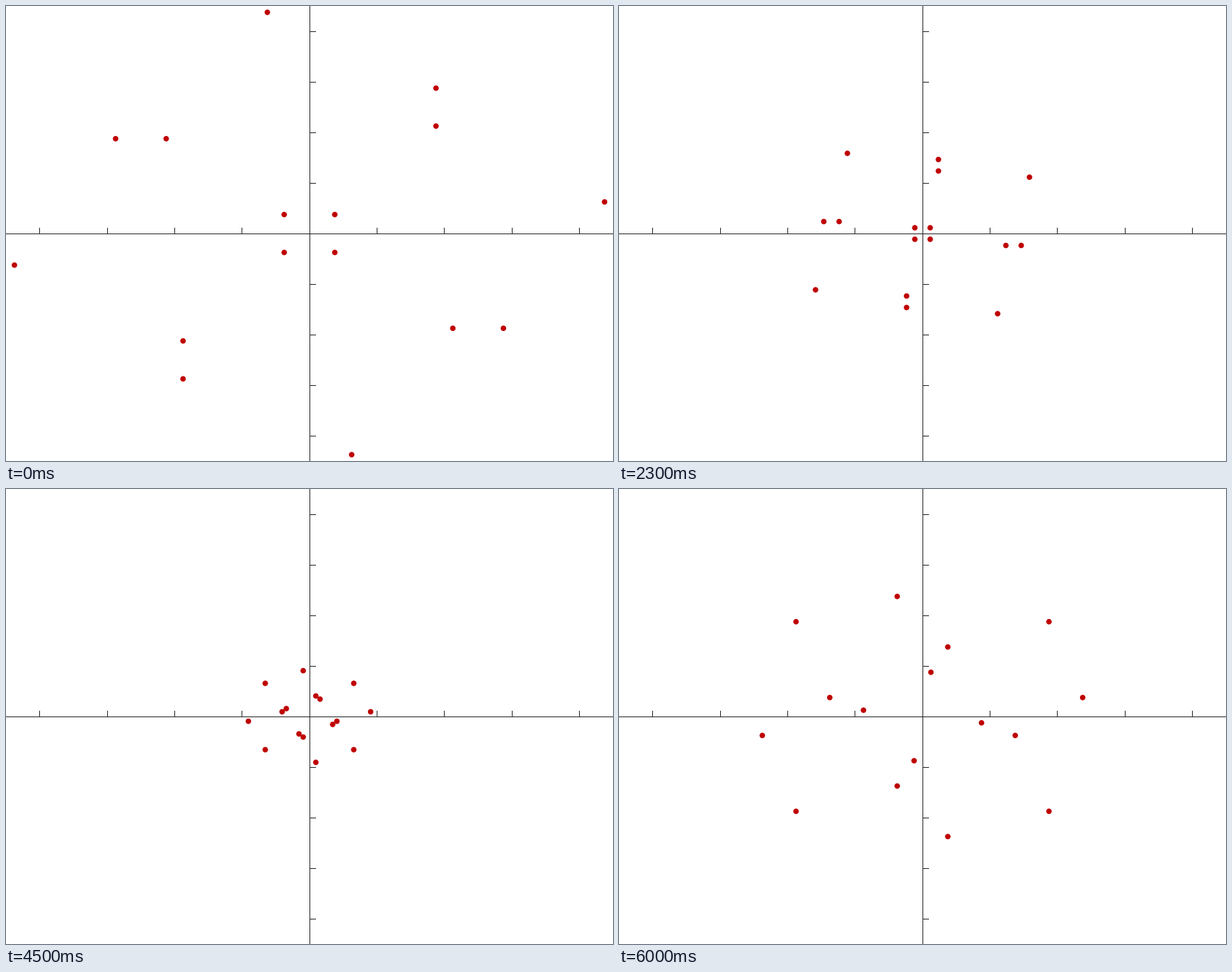
Write a matplotlib script that moves like this. It is 840x630 px and loops after 6100 ms.

```python
import itertools

import matplotlib.pyplot as plt
from matplotlib.animation import FuncAnimation
from matplotlib.collections import LineCollection
from matplotlib.patches import Circle

W, H, DPI = 840, 630, 100
CX, CY = W // 2, H // 2
UNIT_X, UNIT_Y = W / 9, H / 9      # both axes span -4.5 to 4.5
FRAMES, INTERVAL = 61, 100
TICK = 8
RADIUS = 3.8

QPSK = [1 + 1j, -1 + 1j, -1 - 1j, 1 - 1j]
PAIRS = list(itertools.product(QPSK, QPSK))


def constellation(n):
    """Sum of two QPSK signals whose channel gains drift with time."""
    re = 1.25 - 0.025 * n
    q = 0.75 - 0.025 * n
    h1 = complex(re, -2 * q * q)
    h2 = complex(re, -q)
    return [h1 * a + h2 * b for a, b in PAIRS]


def to_px(z):
    return CX + z.real * UNIT_X, CY - z.imag * UNIT_Y


def axis_lines():
    x0, y0 = CX + 0.5, CY + 0.5
    lines = [[(0, y0), (W, y0)], [(x0, 0), (x0, H)]]
    for k in (-4, -3, -2, -1, 1, 2, 3, 4):
        x = int(CX + k * UNIT_X) + 0.5
        y = int(CY + k * UNIT_Y) + 0.5
        lines.append([(x, CY - TICK), (x, CY)])
        lines.append([(CX + 1, y), (CX + 1 + TICK, y)])
    return lines


fig = plt.figure(figsize=(W / DPI, H / DPI), dpi=DPI, facecolor="white")
ax = fig.add_axes([0, 0, 1, 1])
ax.set_xlim(0, W)
ax.set_ylim(H, 0)
ax.axis("off")

# Lines already sit on pixel centres; snapping would shift them by one.
axes_art = LineCollection(axis_lines(), colors="#262626",
                          linewidths=72 / DPI, capstyle="butt", zorder=1)
axes_art.set_snap(False)
ax.add_collection(axes_art, autolim=False)

# Circle patches keep sub-pixel positions, unlike markers.
dots = [ax.add_patch(Circle((0, 0), RADIUS, facecolor=(0.75, 0, 0),
                            linewidth=0, zorder=2)) for _ in PAIRS]


def update(n):
    for dot, z in zip(dots, constellation(n)):
        dot.center = to_px(z)
    return dots


anim = FuncAnimation(fig, update, frames=FRAMES, interval=INTERVAL,
                     repeat=True, repeat_delay=0)
plt.show()
```
